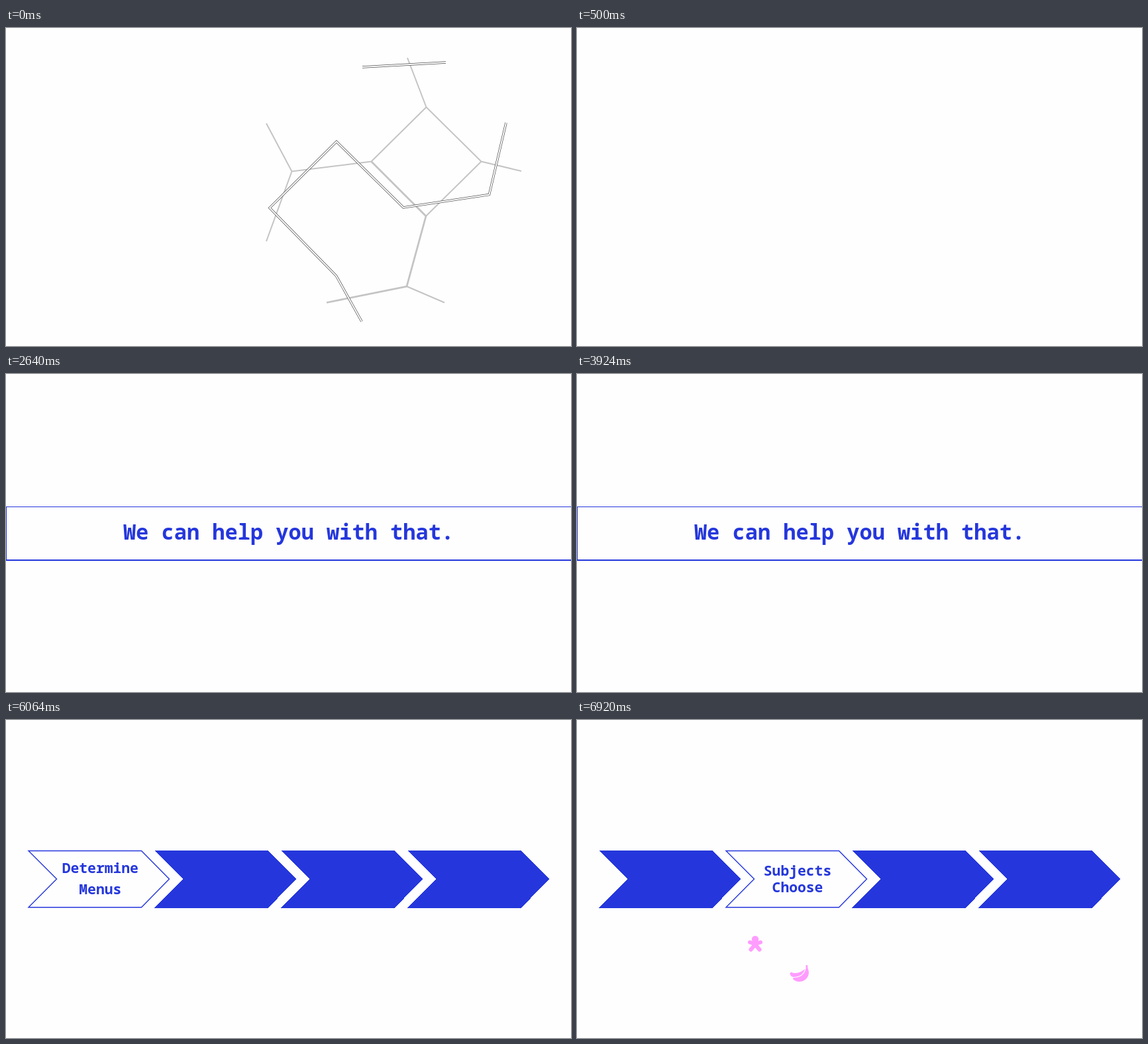
These frames come from a looping animation (853x480 px, 8000 ms). An HTML page:

```html
<!DOCTYPE html>
<html lang="en">
<head>
<meta charset="utf-8">
<style>
  html, body { margin: 0; width: 100%; height: 100%; overflow: hidden; background: #fefefe; }
  svg { display: block; width: 100%; height: 100%; }
  text { font: bold 21.33px "Roboto Mono", "Noto Sans Mono", "DejaVu Sans Mono", monospace; text-anchor: middle; fill: var(--blue); }
  :root { --blue: #2537dc; }
  .net, .trail { fill: none; stroke: #c4c4c4; stroke-width: 2; }
  .bold { stroke-width: 2.8; }
  .trail { stroke: #505050; stroke-width: 3.4; }
  .core { stroke: #fefefe; stroke-width: 2; }
  .arrow { fill: var(--blue); shape-rendering: crispEdges; }
  .open { fill: #fefefe; stroke: var(--blue); stroke-width: 1.4; }
  .pink { fill: #ff9cff; }
  .limbs { fill: none; stroke: #ff9cff; stroke-width: 6; stroke-linecap: round; }
</style>
</head>
<body>
<svg viewBox="0 0 853 480">
  <defs>
    <path id="trail" d="M538 59L664 52M755 143L729.5 251.5L600 271L499 171.5L398 271.5L498.5 374L537 443"/>
  </defs>
  <g class="scene">
    <path class="net" d="M606 45L634.5 119.5L717.5 201.5L634 284M634.5 119.5L551.5 201.5L431.5 216.5L393 144M431.5 216.5L393 322M717.5 201.5L778 216M605 390L662 414.5"/>
    <path class="net bold" d="M551.5 201.5L634 284L605 390L484 414.5"/>
    <use href="#trail" class="trail"/>
    <use href="#trail" class="trail core"/>
  </g>
  <g class="scene"></g>
  <g class="scene">
    <path d="M0 200H853V201H1V280H853V282H0Z" fill="#2537dc"/>
    <text x="426.5" y="250" style="font-size:32px">We can help you with that.</text>
  </g>
  <g class="scene" data-open="0">
    <text x="142.3" y="231">Determine</text>
    <text x="142.3" y="263">Menus</text>
  </g>
  <g class="scene" data-open="1">
    <text x="333" y="235">Subjects</text>
    <text x="333" y="260">Choose</text>
    <circle class="pink" cx="269" cy="331" r="5.2"/>
    <path class="limbs" d="M261 335.5L269 338L277 335.5M262.5 346.5L269 339L275.5 346.5"/>
    <path class="pink" d="M345.5 370h2.5l.5 5c3 7 1 13-4 17c-5 4-14 4-18.5-1l.5-2c10 0 17-4 19-14Z"/>
    <path class="pink" d="M344 375.5c-1 7-7 12.5-18 12.5c-3-1-4.500-3-4.500-6l2-1.500c3 2 8 2 12 .5c4-1.500 7-3.500 8.500-5.500Z"/>
  </g>
</svg>
<script>
const scenes = [...document.querySelectorAll(".scene")];
const starts = [0, 500, 2640, 4780, 6920];
const loop = 8000;

function arrow(i, open) {
  const x = 33 + 191 * i;
  const path = document.createElementNS("http://www.w3.org/2000/svg", "path");
  path.setAttribute("class", open ? "open" : "arrow");
  path.setAttribute("d", open
    ? `M${x + 1} 197.500H${x + 171.500}L${x + 213.500} 240L${x + 171.500} 282.700H${x + 1}L${x + 43.500} 240Z`
    : `M${x} 197H${x + 172}L${x + 214} 240L${x + 172} 283.500H${x}L${x + 43} 240Z`);
  return path;
}

for (const scene of scenes) {
  if (scene.dataset.open === undefined) continue;
  scene.prepend(...[0, 1, 2, 3].map(i => arrow(i, i === +scene.dataset.open)));
}

function draw() {
  const time = performance.now() % loop;
  const current = starts.findLastIndex(start => time >= start);
  scenes.forEach((scene, i) => scene.style.display = i === current ? "" : "none");
  requestAnimationFrame(draw);
}
draw();
</script>
</body>
</html>
```
